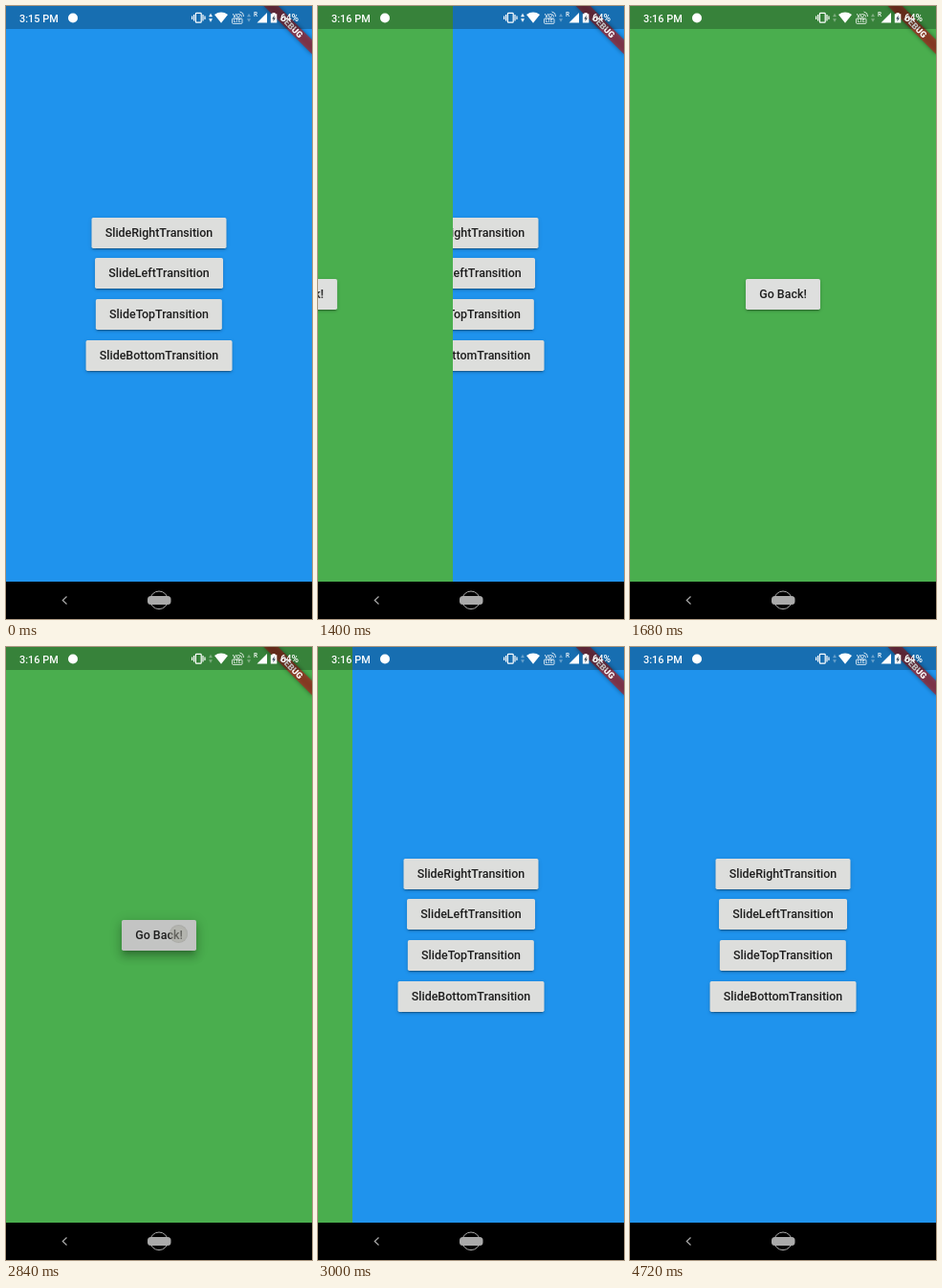
An HTML page for the animation above (4.84 s loop, 320 by 640 pixels).

```html
<!DOCTYPE html>
<html lang="en">
<head>
<meta charset="utf-8">
<title>Slide transitions</title>
<style>
  html, body { margin: 0; width: 100%; height: 100%; overflow: hidden; background: #000; }
  #stage { position: relative; width: 320px; height: 640px; overflow: hidden; font-family: Roboto, sans-serif; }
  .page { position: absolute; inset: 0 0 39px; overflow: hidden; }
  .home { background: #1f93ed; }
  .next { background: #4aae4e; }

  .btn {
    position: absolute; left: 50%; transform: translateX(-50%);
    box-sizing: border-box; height: 32px; padding: 0 14.22px;
    border-radius: 1.8px; background: #dddedc; color: #1d1d1d;
    font: 500 12.44px/32px Roboto, sans-serif; white-space: nowrap;
    box-shadow: 0 2.7px 1px -1.8px #0003, 0 1.8px 1.8px #0002, 0 1px 4.4px #0002;
  }
  .touch { position: absolute; width: 19px; height: 19px; border-radius: 50%; opacity: 0; }
  .touch.a { left: 198px; top: 230px; background: #e9e9e9a8; box-shadow: inset 0 0 2px #888a; }
  .touch.b { left: 171px; top: 290px; background: #a5a59b80; box-shadow: inset 0 0 2px #8888; }

  /* One 4840 ms loop shared by every part */
  .next, .next .btn, .touch, .old, .new, .data { animation: 4840ms step-end infinite; }
  .next { animation-name: slide; }
  .next .btn { animation-name: press; animation-timing-function: linear; }
  .touch.a { animation-name: tapA; }
  .touch.b { animation-name: tapB; }
  .old { animation-name: old; }
  .new { animation-name: new; }
  .data { animation-name: data; }

  @keyframes slide {
    0% { transform: translateX(-320px); }
    26.446% { transform: translateX(-307px); animation-timing-function: steps(7); }
    32.231% { transform: translateX(-8px); }
    33.057% { transform: none; }
    58.677% { transform: none; animation-timing-function: steps(4); }
    61.983% { transform: translateX(-284.5px); }
    62.809%, 100% { transform: translateX(-320px); }
  }
  @keyframes press {
    0%, 52.9% {
      background: #dedfde;
      box-shadow: 0 2.7px 1px -1.8px #0003, 0 1.8px 1.8px #0002, 0 1px 4.4px #0002;
    }
    57.02%, 62.809% {
      background: #c3c4c3;
      box-shadow: 0 4.4px 4.4px -2.7px #0003, 0 7px 9px 1px #0002, 0 2.7px 12px 2px #0002;
    }
    62.82%, 100% {
      background: #dedfde;
      box-shadow: 0 2.7px 1px -1.8px #0003, 0 1.8px 1.8px #0002, 0 1px 4.4px #0002;
    }
  }
  @keyframes tapA { 0% { opacity: 0; } 23.14% { opacity: 1; } 25.619%, 100% { opacity: 0; } }
  @keyframes tapB { 0% { opacity: 0; } 51.239% { opacity: 1; } 59.504%, 100% { opacity: 0; } }
  @keyframes old { 0% { opacity: 1; } 11.57%, 100% { opacity: 0; } }
  @keyframes new { 0% { opacity: 0; } 11.57%, 100% { opacity: 1; } }
  @keyframes data {
    0% { opacity: 1; } 34.71% { opacity: .35; }
    74.38% { opacity: 1; } 76.859% { opacity: .35; }
    95.041% { opacity: 1; } 97.52%, 100% { opacity: .35; }
  }

  svg { position: absolute; inset: 0; }
  svg text { font-family: Roboto, sans-serif; font-weight: 500; }
</style>
</head>
<body>
<div id="stage">
  <div class="page home">
    <div class="btn" style="top:220.5px">SlideRightTransition</div>
    <div class="btn" style="top:263.2px">SlideLeftTransition</div>
    <div class="btn" style="top:305.8px">SlideTopTransition</div>
    <div class="btn" style="top:348.5px">SlideBottomTransition</div>
  </div>
  <div class="page next">
    <div class="btn" style="top:284.5px">Go Back!</div>
  </div>
  <div class="touch a"></div>
  <div class="touch b"></div>

  <svg width="320" height="640" viewBox="0 0 320 640">
    <defs>
      <filter id="soft" x="-20%" y="-80%" width="140%" height="260%"><feGaussianBlur stdDeviation="2"/></filter>
      <path id="arrows" d="M-2 -1L0 -4.5L2 -1ZM-2 1L0 4.5L2 1Z"/>
    </defs>

    <!-- Debug ribbon -->
    <g transform="translate(320) rotate(45)">
      <rect x="-35.6" y="24.9" width="71.2" height="10.7" opacity=".4" filter="url(#soft)"/>
      <rect x="-35.6" y="24.9" width="71.2" height="10.7" fill="#b71c1c" fill-opacity=".63"/>
      <text y="33.5" text-anchor="middle" fill="#fff" style="font-size:9.07px;font-weight:900">DEBUG</text>
    </g>
    <rect width="320" height="24" opacity=".25"/>

    <!-- Status bar -->
    <g fill="#fff">
      <g font-size="10.9">
        <text class="old" x="14" y="16.5">3:15 PM</text>
        <text class="new" x="14" y="16.5">3:16 PM</text>
      </g>
      <circle cx="70" cy="12.5" r="5"/>
      <g fill="none" stroke="#fff" stroke-width="1.2">
        <rect x="198.4" y="7.4" width="5.8" height="9.8" rx=".8"/>
        <path d="M196.6 9V15.5M206 9V15.5M194.6 10.5V14M208 10.5V14"/>
      </g>
      <use class="data" href="#arrows" x="214" y="12.2"/>
      <path d="M218 9Q225 4.2 232 9L225 17.8Z"/>
      <text x="237" y="12" font-size="6">VO</text>
      <path d="M244.5 8.5Q246.5 9 246.7 11.5M244.5 6Q248.5 6.5 248.7 11" fill="none" stroke="#fff" stroke-width=".8"/>
      <rect x="236.5" y="13" width="10.5" height="5.4" rx="1" fill="none" stroke="#fff" stroke-width=".8"/>
      <text x="241.8" y="17.4" font-size="4.6" text-anchor="middle">LTE</text>
      <use href="#arrows" x="254" y="12.2" opacity=".35"/>
      <text x="259" y="11.2" font-size="6.4">R</text>
      <path d="M273 7V17.5H262.5Z"/>
      <path d="M278.5 7H281.5V8.2H283.3V17.5H276.8V8.2H278.5Z"/>
      <path d="M280.8 9.5L278.2 13.4H279.8L279.2 16.3L282 12.4H280.3Z" fill="#345"/>
      <text x="287" y="16.3" font-size="10.2">64%</text>
    </g>

    <!-- Navigation bar -->
    <rect y="601" width="320" height="39"/>
    <path d="M63.5 616.5L59.3 620.5L63.5 624.5" fill="none" stroke="#aaa" stroke-width="1.2"/>
    <circle cx="160" cy="620.3" r="9.3" fill="none" stroke="#aaa"/>
    <rect x="148" y="616" width="24.5" height="9" rx="3.5" fill="#aaa"/>
  </svg>
</div>
</body>
</html>
```
